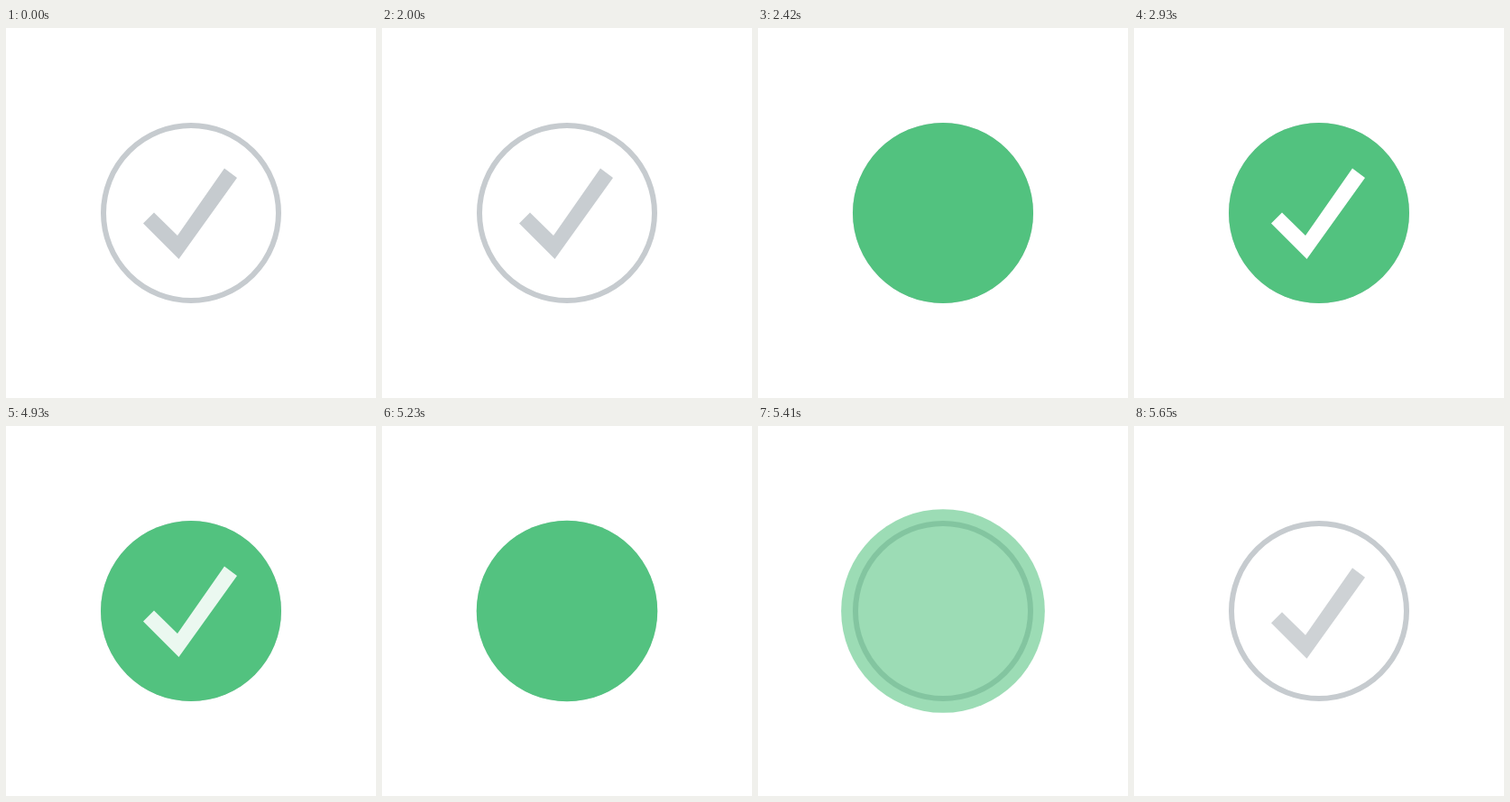
An HTML page that plays this animation: 410 px wide and 410 px high, repeating every 5680 ms.

```html
<!DOCTYPE html>
<html lang="en">
<head>
<meta charset="utf-8">
<title>Check toggle</title>
<style>
  html, body { margin: 0; height: 100%; overflow: hidden; background: #fff; }
  svg { display: block; width: 100vw; height: 100vh; }
</style>
</head>
<body>
<svg viewBox="0 0 410 410">
  <defs>
    <path id="check" d="M164 204.5 L190 230 L242 155.5 L256 166 L191.5 256 L152 216.5 Z"/>
  </defs>
  <circle cx="205" cy="205" r="97" fill="none" stroke="#c6cbcf" stroke-width="6"/>
  <use id="idle" href="#check" fill="#c6cbcf"/>
  <circle id="disc" cx="205" cy="205" r="100" fill="#52c27f"/>
  <use id="done" href="#check" fill="#fff"/>
</svg>
<script>
const LOOP = 5680, STEP = 30, TURN_ON = 2000, TURN_OFF = 4930;
const [idle, disc, done] = ['idle', 'disc', 'done'].map(id => document.getElementById(id));

// Number of 30 ms steps taken since a moment; the first counts at once.
const stepsSince = (time, start) => Math.max(0, Math.floor((time - start) / STEP) + 1);
const progress = (n, from, to) => Math.min(1, Math.max(0, (n - from) / (to - from)));
const easeIn = (t, power) => t ** power;
const easeOut = (t, power) => 1 - (1 - t) ** power;

function set(el, opacity, attrs) {
  el.setAttribute('opacity', opacity);
  for (const name in attrs) el.setAttribute(name, attrs[name]);
}

function draw(time) {
  const on = stepsSince(time, TURN_ON);
  const off = stepsSince(time, TURN_OFF);

  // Grey check: fades in place, later rises back from below.
  const back = progress(off, 19, 26);
  const idleAlpha = off ? back : 1 - easeIn(progress(on, 0, 6), 1.7);
  set(idle, idleAlpha, { transform: `translate(0 ${off ? 12.6 * (1 - back) : 0})` });

  // Green disc: shrinks onto the ring, later swells away.
  const cover = easeOut(progress(on, 5, 19), 5.5) - easeIn(progress(off, 5, 19), 5.5);
  set(disc, cover, { r: 100 + 30 * (1 - cover) });

  // White check: drops in from a large scale, later fades in place.
  const land = easeOut(progress(on, 19, 32), 5);
  const scale = 1 + 4.5 * (1 - land);
  set(done, land * (1 - easeIn(progress(off, 0, 6), 1.2)), {
    transform: `translate(199 204) scale(${scale}) translate(-199 -204)`
  });
}

const start = performance.now();
function tick() {
  draw((performance.now() - start) % LOOP);
  requestAnimationFrame(tick);
}
tick();
</script>
</body>
</html>
```
